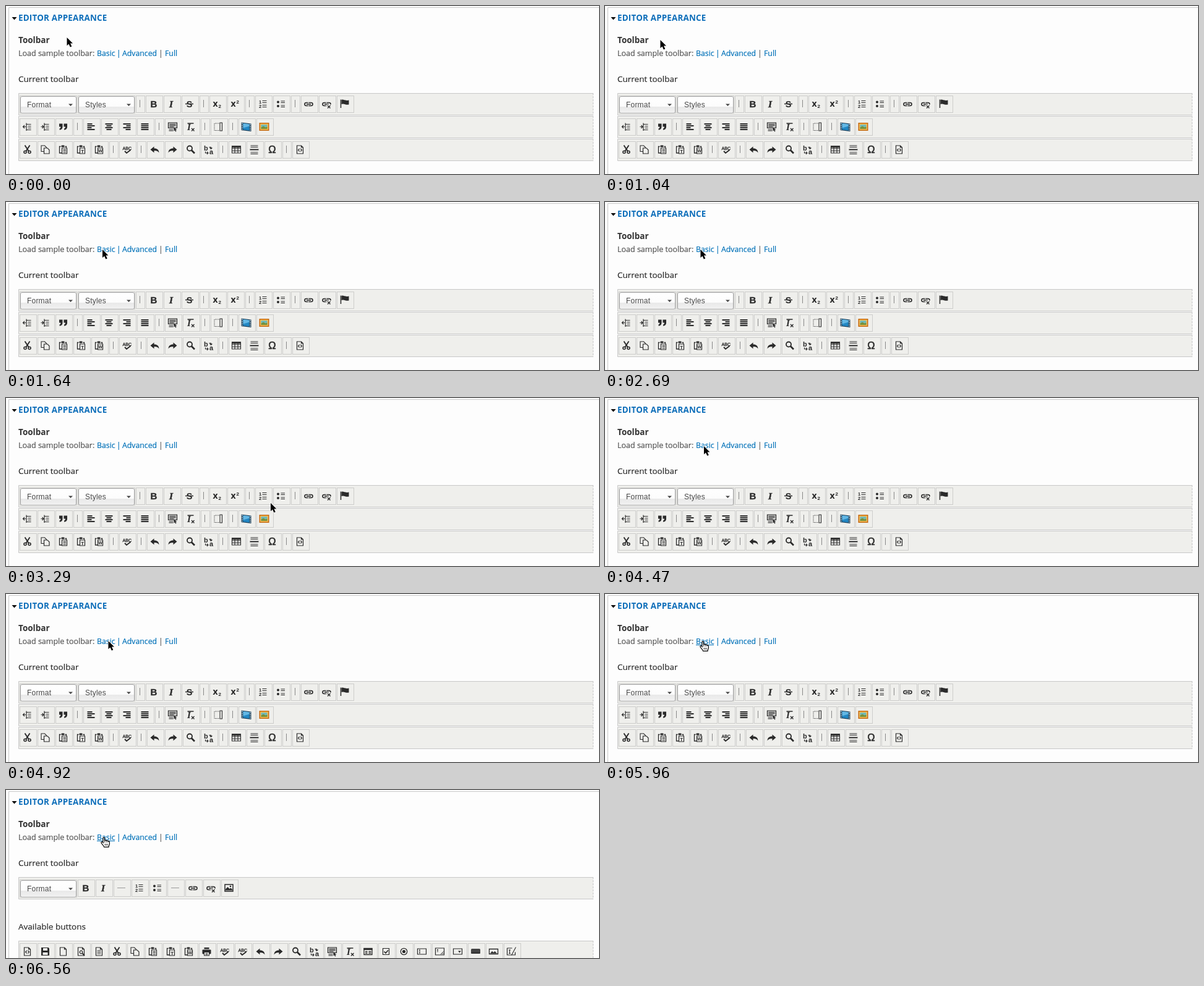
Recreate the animation shown at these times as an HTML page. Size 959x272 px, loop 8 s.

```html
<!DOCTYPE html>
<html lang="en">
<head>
<meta charset="utf-8">
<title>Editor toolbar settings</title>
<style>
html, body { margin: 0; width: 100%; height: 100%; overflow: hidden; background: #fdfdfd; }
svg { display: block; position: absolute; left: 0; top: 0; }
text { font-family: "Open Sans", "Noto Sans", sans-serif; fill: #333; white-space: pre; }
.label { fill: #2b2b2b; stroke: #2b2b2b; stroke-width: .2; }
.hint { fill: #555; stroke: #555; stroke-width: .2; }
.link { fill: #0071b8; stroke: #0071b8; stroke-width: .2; }
.title { fill: #0f6fba; }
.arial { font-family: "Liberation Sans", Arial, sans-serif; }
.serif { font-family: "Liberation Serif", "Times New Roman", serif; }
.line { fill: none; stroke: #c8c8c8; }
.cell { fill: #efefec; stroke: #cdcdcb; }
.icon, .icon text { fill: #2a2a2a; }
.s { fill: none; stroke: #2a2a2a; }
</style>
</head>
<body>
<svg id="stage" width="959" height="272" viewBox="0 0 959 272"></svg>
<script>
const LOOP = 8000;

const S = (d, w = 1) => `<path class="s" d="${d}" stroke-width="${w}"/>`;
const F = (d, fill = '#2a2a2a') => `<path d="${d}" fill="${fill}"/>`;
const R = (x, y, w, h, attrs = '') => `<rect x="${x}" y="${y}" width="${w}" height="${h}" ${attrs}/>`;
const T = (str, x, y, size, attrs = '') => `<text x="${x}" y="${y}" font-size="${size}" ${attrs}>${str}</text>`;
const bold = 'font-weight="700"';
const arial = 'class="arial" font-weight="700"';
const serif = 'class="serif" font-weight="700"';
const bars = (x, widths, top, gap, w) => S(widths.map((n, i) => `M${x(n)} ${top + i * gap}h${n}`).join(''), w);
const mirror = body => `<g transform="scale(-1 1)">${body}</g>`;

// Icons are drawn around their own centre.
const page = S('M-5-6.5H2L5-3.5V6.5H-5ZM2-6.5V-3.5H5', 1.2);
const clip = S('M-2 5.5H-6V-5H-4M3-5H5V-3', 1.3) + R(-3, -7, 5, 3, 'rx="1"') +
  S('M-2-2.5H6V6.5H-2Z', 1.2);
const align = x => widths => bars(x, widths, -4.5, 3, 1.8);
const indentLines = S('M-1-4H6M1-1H6M1 2H6M-1 5H6M-1.5-6V6.5', 1.2);
const chain = S('M-1-2H-4A2.5 2.5 0 0 0-4 3H-1M0-2H4A2.5 2.5 0 0 1 4 3H0', 1.6) + S('M-3.5.5H3.5', 1.5);
const smallX = S('M1.5 2.5L6 7M6 2.5L1.5 7', 1.4);
const back = F('M-7 0L-1-5V-2C4-2 6.5 0 7 5C4.5 2 2.5 1.8-1 1.8V5Z');
const field = S('M-7-4.5H7V4.5H-7Z', 1.2);

const icons = {
  bold: T('B', -5, 5, 15, arial + ' stroke="#333" stroke-width=".4"'),
  italic: T('I', -3.5, 5, 15.5, serif + ' font-style="italic" stroke="#333" stroke-width=".4"'),
  strike: T('S', -4.8, 5, 14.5, arial) + S('M-6.5 0H6.5', 1.5),
  sub: T('x', -7, 4, 14, bold) + T('2', 2, 6.5, 8, arial),
  sup: T('x', -7, 4.5, 14, bold) + T('2', 2, -1, 8, arial),
  ol: T('1', -6.5, -1, 7.5, arial) + T('2', -6.5, 6.5, 7.5, arial) + S('M-1-5H6M-1-2H6M-1 2H6M-1 5H6', 1.2),
  ul: '<circle cx="-4.5" cy="-3" r="2"/><circle cx="-4.5" cy="3.5" r="2"/>' + S('M0-4.5H6.5M0-2H6.5M0 2.5H6.5M0 5H6.5', 1.2),
  link: chain,
  unlink: chain + R(.5, 1, 7, 7, 'fill="#efefec"') + smallX,
  flag: S('M-6-7V6.5', 1.5) + F('M-5-6.5C-2-8 1-4.5 7-6V1C2 2.5-1-1.5-5 .5Z'),
  outdent: indentLines + S('M-2.5 0H-7M-4.5-2.5L-7 0L-4.5 2.5', 1.2),
  indent: indentLines + S('M-7 0H-2.5M-5-2.5L-2.5 0L-5 2.5', 1.2),
  quote: F('M-6.5-5H-1V0C-1 3-3 5-6 5V3C-4.5 2.5-4 1.5-4 0H-6.5ZM1-5H6.5V0C6.5 3 4.5 5 1.5 5V3C3 2.5 3.5 1.5 3.5 0H1Z'),
  left: align(() => -6)([8, 12, 7, 12]),
  center: align(n => -n / 2)([12, 8, 12, 8]),
  right: align(n => 6 - n)([12, 7, 12, 8]),
  justify: align(() => -6)([12, 12, 12, 12]),
  all: R(-7, -7, 14, 9, 'fill="#c9c9c7"') + S('M-7-6.5H7V2H-7Z', 1.2) + S('M-5-4H5M-5-2H5M-5 0H2M-6 4.5H1M-6 6.5H1', 1.1) +
    F('M2 1L7 5L4.8 5.2L6 7.5L4.5 8L3.5 5.8L2 7Z'),
  clear: T('I', -5.5, 5, 15, serif + ' font-style="italic"') + S('M-5-5.5H5', 1.5) + smallX,
  div: '<path d="M1-5.5H-6.5V6H1" fill="none" stroke="#555" stroke-dasharray="1.5 1"/>' + S('M2.5-6.5H6V6.5H2.5Z', 1.1),
  film: F('M-8-7L8-5V7.5L-8 5.5Z', '#173a55') + F('M-5-5.5L5-4.3V6L-5 4.8Z', '#2388c4') +
    F('M-5-5.5L5-4.3V-1L-5 2Z', '#63b7e4') +
    '<path d="M-6.5-6V5.5M6.5-4.5V7" stroke="#d3e8f4" stroke-width="1.4" stroke-dasharray="1.5 1.5"/>',
  painting: R(-8, -6.5, 16, 13, 'fill="#c56a12"') + R(-6.5, -5, 13, 10, 'fill="#f6bd55"') +
    R(-5, -3.5, 10, 7, 'fill="#73b9b6"') + F('M-5 3.5V1L-1-1L2 1L5 0V3.5Z', '#77913a'),
  cut: S('M-4-7L2.5 3M4-7L-2.5 3', 1.9) + '<g class="s" stroke-width="1.6"><circle cx="-3.5" cy="4" r="2"/><circle cx="3.5" cy="4" r="2"/></g>',
  copy: S('M-6.5-6.5H-1L2-3.5V3H-6.5Z', 1.1) + '<path d="M-2-2.5H3.5L6.5.5V6.5H-2Z" fill="#efefec" stroke="#2a2a2a" stroke-width="1.2"/>',
  paste: clip + S('M0 0H4.5M0 2H4.5M0 4.5H4.5', 1),
  pasteText: clip + T('T', -.2, 5, 8, arial),
  pasteDoc: clip + T('W', -1.2, 4.8, 7, arial),
  abc: T('ABC', -7, 0, 7.2, 'class="arial" stroke="#2a2a2a" stroke-width=".3"') + S('M-3.5 2.5L-.5 5.5L6 .5', 1.9),
  undo: back, redo: mirror(back),
  find: '<circle class="s" cx="-1.5" cy="-2" r="4" stroke-width="1.8"/>' + S('M1.5 1L6.5 6', 2.6),
  replace: T('b', -7.5, 1, 11, arial) + T('a', 1.5, 7, 11, arial) + S('M1-4H4V-1.5M2-3L4-1L6-3M-5 3V5.5H-1M-2.5 3.5L-.5 5.5L-2.5 7.5', 1.1),
  table: S('M-7-5.5H7V5.5H-7ZM-7-1.5H7M-7 2H7M-2.5-5V5.5M2.5-5V5.5', 1.1) + R(-7.5, -6, 15, 3),
  hr: S('M-6-6.5H6M-6-4H6M-6 4.5H6M-6 7H6', 1.1) + S('M-7 0H7', 2),
  omega: T('Ω', -6.2, 5.5, 16.5, 'class="arial" stroke="#2a2a2a" stroke-width=".6"'),
  source: page + S('M-.8-1.5L-3 .8L-.8 3M.8-1.5L3 .8L.8 3', 1.2),
  dash: '<path d="M-6.5 0H6.5" stroke="#999"/>',
  image: S('M-6.5-5.5H6.5V5.5H-6.5Z', 1.5) + F('M-5.5 4V2L-2-1.5L1 1.5L3 0L5.5 2.5V4Z') + '<circle cx="2.5" cy="-2.5" r="1.3"/>',
  save: F('M-6.5-6.5H5L6.5-5V6.5H-6.5Z') + R(-3.5, -5.5, 7, 4, 'fill="#efefec"') + R(-4, 1.5, 8, 4, 'fill="#efefec"'),
  page,
  preview: page + '<circle class="s" cx="0" cy="1" r="2.3" stroke-width="1.3"/>' + S('M2 3L5.5 6.5', 1.8),
  lines: page + S('M-3-1.5H3M-3 1H3M-3 3.5H3', 1.2),
  print: R(-7, -3, 14, 7, 'rx="1"') + R(-4, -6.5, 8, 2.5) + R(-4, 1, 8, 5.5, 'fill="#efefec" stroke="#2a2a2a"') + S('M-2 3H2M-2 5H2', 1),
  form: S('M-6.5-5H6.5V5H-6.5Z', 1.3) + R(-7, -5.5, 14, 3) + S('M-4.5 0H-1M-4.5 2.5H-1M1 0H5M1 2.5H5', 1.4),
  check: S('M-5-5H5V5H-5Z', 1.2) + S('M-3 0L-.5 2.5L3.5-2', 1.7),
  radio: '<circle class="s" r="5.2" stroke-width="1.3"/><circle r="2.6"/>',
  field: field + S('M-4.5-2.5H-2.5M-3.5-2.5V2.5M-4.5 2.5H-2.5', 1),
  area: S('M-7-5.5H7V5.5H-7Z', 1.2) + S('M-4.5-3H-2.5M-3.5-3V1M1.5 4.5L6 0M4 4.5L6 2.5', 1),
  select: field + F('M.5-1H5.5L3 2Z'),
  button: R(-7.5, -4.5, 15, 8, 'rx="1.5" fill="#444"') + S('M-7 2.5H7', 1.5),
  imageButton: S('M-7-4H7V4H-7Z', 1.3) + F('M-5.5 3L-2.5-.5L0 1.5L2-.5L5.5 3Z'),
  hidden: S('M-7-5.5H1M-7-5.5V5.5H6V1', 1.2) + S('M-4.5-2.5H-1.5M-3-2.5V3M-4.5 3H-1.5M7-7L0 6', 1.1),
};

const cell = (x, y, w) => R(x + .5, y + .5, w - 1, 27, 'class="cell"');

function row(y, x, names) {
  let out = R(20, y, 930, 36, 'fill="#efefec"') +
    `<path class="line" d="M949.5 ${y + .5}H20.5V${y + 35.5}H949.5"/>` +
    `<path class="line" d="M949.5 ${y}V${y + 36}" stroke-dasharray="3 2"/>`;
  for (const name of names.split(' ')) {
    if (name === '|') {
      out += cell(x, y + 4, 15) + `<path d="M${x + 6.5} ${y + 11}V${y + 23}" stroke="#888"/>`;
      x += 16;
    } else {
      out += cell(x, y + 4, 28) +
        `<g class="icon" transform="translate(${x + 12.5} ${y + 17.5})">${icons[name]}</g>`;
      x += 29;
    }
  }
  return out;
}

const dropdown = (x, label) => R(x - .5, 145.5, 92, 28, 'class="cell"') +
  R(x + .5, 146.5, 90, 27, 'rx="2.5" fill="url(#face)" stroke="#a9a9a9"') +
  T(label, x + 11, 164, 12, 'class="arial" letter-spacing=".2" style="fill:#484848"') +
  F(`M${x + 78} 158.5H${x + 85}L${x + 81.5} 162Z`, '#444');

const header = R(0, 0, 959, 272, 'fill="#fdfdfd"') +
  '<path class="line" d="M4.5 272V2.5H959"/>' + F('M9.5 18H17.5L13.5 22.5Z', '#000') +
  T('EDITOR APPEARANCE', 20, 24, 13.4, bold + ' class="title" letter-spacing=".2"') +
  T('Toolbar', 20, 60, 13.5, bold) +
  T('Load sample toolbar:', 20, 81, 12.5, 'class="hint"') +
  T('Basic', 147, 81, 12.3, 'class="link"') + T('|', 179, 81, 12, 'class="link"') +
  T('Advanced', 188, 81, 12.3, 'class="link"') + T('|', 247, 81, 12) +
  T('Full', 257, 81, 12.3, 'class="link"') +
  '<path id="underline" d="M147 82.5H176" stroke="#0071b8"/>' +
  T('Current toolbar', 20, 123, 13.5, 'class="label"');

const full = row(141, 210, '| bold italic strike | sub sup | ol ul | link unlink flag') +
  dropdown(23, 'Format') + dropdown(117, 'Styles') +
  row(178, 22, 'outdent indent quote | left center right justify | all clear | div | film painting') +
  row(215, 22, 'cut copy paste pasteText pasteDoc | abc | undo redo find replace | table hr omega | source');

const basic = row(141, 116, 'bold italic dash ol ul dash link unlink image') + dropdown(23, 'Format') +
  T('Available buttons', 20, 226, 13.5, 'class="label"') +
  row(244, 22, 'source save page preview lines cut copy paste pasteText pasteDoc print abc abc undo redo ' +
    'find replace all clear form check radio field area select button imageButton hidden');

const arrow = '<path d="M0 0V13.2L3 10.4L5.3 15.6L7.8 14.5L5.5 9.5H9.5Z" fill="#000" stroke="#fff" stroke-width="1.2" paint-order="stroke"/>';
const hand = '<path d="M4 8.6V2C4 .2 6.5.2 6.5 2V6C7 4.8 9 5 9.2 6.2C10 5.3 11.7 5.6 11.8 7C12.8 6.3 14.4 7 14.4 8.4V11C14.4 13 13 13.6 13 16.4H5.6C5 13.5 2 12 1 9.6C.5 8.2 2 7.3 3 8.2L4.8 10" fill="#fff" stroke="#000" stroke-width="1.2"/>' +
  S('M6.5 6V9M9.2 6.5V9M11.8 7V9M7.2 11V14M9.2 11V14M11.2 11V14', .9);

const stage = document.getElementById('stage');
stage.innerHTML = `<defs><linearGradient id="face" x2="0" y2="1">
  <stop stop-color="#fff"/><stop offset=".6" stop-color="#fcfcfc"/>
  <stop offset=".61" stop-color="#e9e9e9"/><stop offset="1" stop-color="#f1f1f1"/></linearGradient></defs>
  ${header}<g id="full">${full}</g><g id="basic">${basic}</g>
  <g id="arrow">${arrow}</g><g id="hand">${hand}</g>`;

// Pointer runs: start time, then one x,y pair per step.
const STEP = 150;
const runs = [
  [0, [98.5, 51]],
  [150, [97, 44], [94, 39], [91, 41]],
  [590, [89, 44]],
  [1040, [89.5, 55], [104, 62], [130, 71], [150, 76], [156, 77]],
  [2690, [154.5, 77], [153, 75], [180, 112], [290, 152], [428, 170], [405, 212], [345, 223]],
  [3730, [299, 221], [250, 165]],
  [4020, [214.5, 122], [188, 97], [172, 84], [160, 78], [162, 79], [164, 78], [165.5, 76]],
  [5670, [162, 78], [154, 77]],
  [5960, [153, 76]],
];
const HOVER = 5820, LOADED = 6560;
const steps = runs.flatMap(([start, ...points]) =>
  points.map((p, i) => ({ t: start + i * STEP, p })));

const part = Object.fromEntries(['full', 'basic', 'arrow', 'hand', 'underline']
  .map(id => [id, document.getElementById(id)]));
const show = (name, on) => part[name].setAttribute('visibility', on ? 'visible' : 'hidden');

function draw(t) {
  const [x, y] = steps.findLast(s => s.t <= t).p;
  const hover = t >= HOVER;
  const loaded = t >= LOADED;
  show('full', !loaded);
  show('basic', loaded);
  show('arrow', !hover);
  show('hand', hover);
  show('underline', hover);
  part[hover ? 'hand' : 'arrow'].setAttribute('transform', `translate(${x} ${y})`);
}

const begin = performance.now();
function tick() {
  draw((performance.now() - begin) % LOOP);
  requestAnimationFrame(tick);
}
tick();
</script>
</body>
</html>
```
